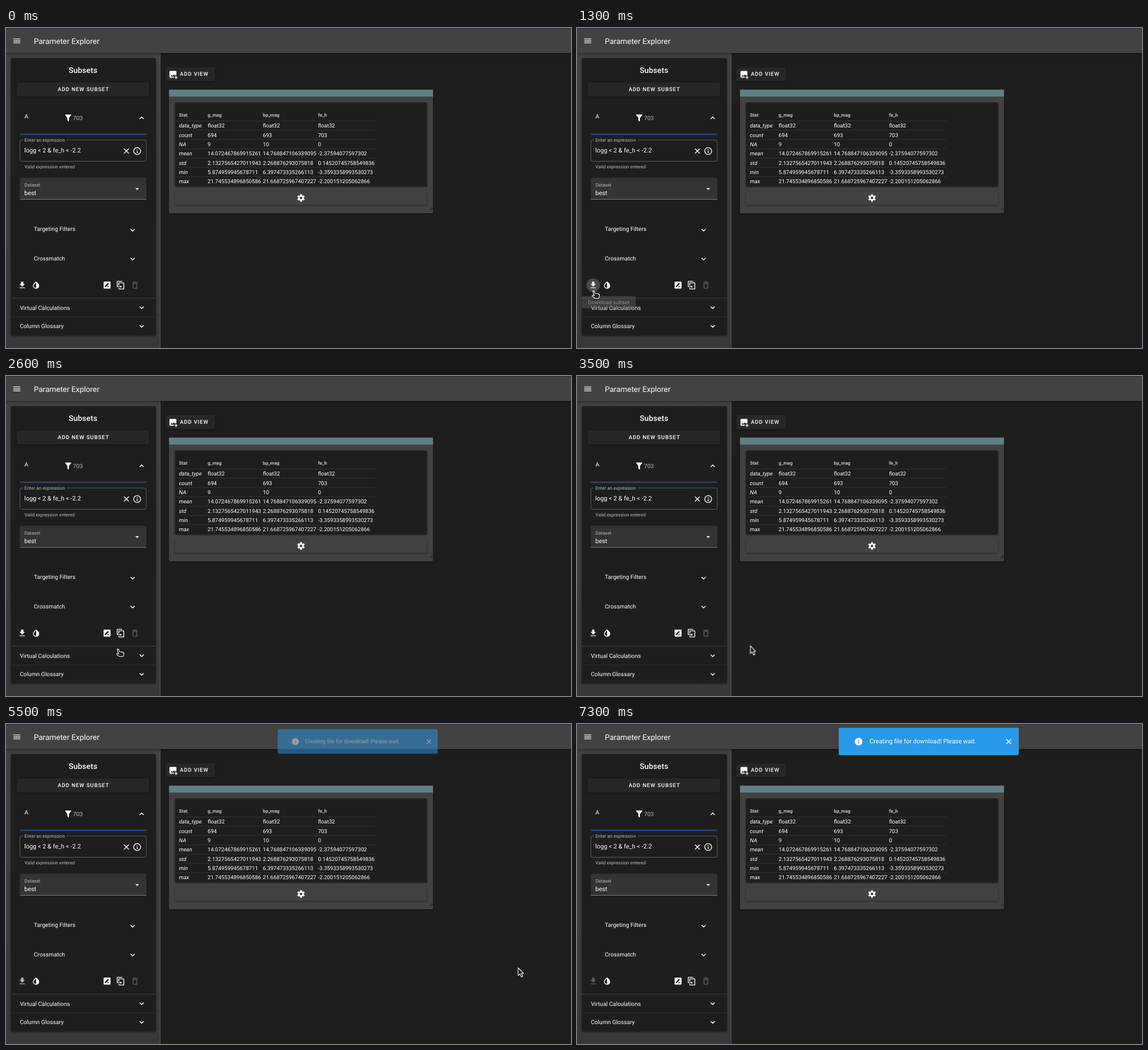
These frames come from a looping animation (995 px wide and 563 px high, 8100 ms). An HTML page:

```html
<!DOCTYPE html>
<html lang="en">
<head>
<meta charset="utf-8">
<title>Parameter Explorer</title>
<style>
  html, body { margin: 0; width: 100%; height: 100%; overflow: hidden; background: #1e1f1c; }
  svg { display: block; width: 100%; height: 100%; }
  text { font-family: Roboto, sans-serif; fill: #fff; white-space: pre; text-rendering: geometricPrecision; }
  .raised { filter: drop-shadow(0 1px 1.5px rgba(0, 0, 0, .45)); }
  .pop { transform-box: fill-box; transform-origin: center; }
  .stroke { fill: none; stroke: #fff; stroke-width: 2; }
  .cursor { fill: #1c1c1c; stroke: #fff; stroke-width: 1.1; stroke-linejoin: round; }
  #hand, #arrow, #tip, #toast, #hover, #ripple { opacity: 0; }
</style>
</head>
<body>
<svg id="stage" viewBox="0 0 995 563" xmlns="http://www.w3.org/2000/svg"></svg>
<script>
const LOOP = 8100;
const SCALE = 0.6785;
const DARK = '#1e1f1c';
const MUTED = '#b9b9b8';

// Icons live on a 24-unit grid; "line" icons are stroked, the others filled.
const lineIcons = {
  menu: 'M3 7H21M3 12H21M3 17H21',
  up: 'M6.7 14.7L12 9.4L17.3 14.7',
  down: 'M6.7 9.3L12 14.6L17.3 9.3',
  close: 'M5.7 5.7L18.3 18.3M18.3 5.7L5.7 18.3',
  infoOutline: 'M3 12A9 9 0 1 1 21 12A9 9 0 1 1 3 12M12 7V9M12 11V17',
  trash: 'M7 8H17V19Q17 20 16 20H8Q7 20 7 19ZM5 5H19M9 4H15',
};
const solidIcons = {
  filter: 'M5 3H19Q20.6 3.4 19.8 4.6L14 12V20Q13.6 21.4 12.3 20.7L10 18.4V12L4.2 4.6Q3.4 3.4 5 3Z',
  caret: 'M7 10L12 15L17 10Z',
  download: 'M5 20H19V18H5ZM19 9H15V3H9V9H5L12 16Z',
  invert: 'M12 19.6A6 6 0 0 1 7.8 9.3L12 5.1ZM17.7 7.9L12 2.3L6.3 7.9A8 8 0 1 0 17.7 7.9Z',
  rename: 'M18 17H10.5L12.5 15H18ZM6 17V14.5L14.2 6.4L16.6 8.8L8.5 17ZM19 3H5Q3 3 3 5V19Q3 21 5 21H19Q21 21 21 19V5Q21 3 19 3Z',
  copy: 'M11 17H4Q2 17 2 15V3Q2 1 4 1H16V3H4V15H11V13L15 16L11 19ZM19 21V7H8V13H6V7Q6 5 8 5H19Q21 5 21 7V21Q21 23 19 23H8Q6 23 6 21V19H8V21Z',
  addImage: 'M5 3Q3 3 3 5V19Q3 21 5 21H14.1Q13.9 19.5 14.3 18H5L8.5 13.5L11 16.5L14.5 12L16.7 15Q18.6 13.8 21 14.1V5Q21 3 19 3ZM19 16V19H16V21H19V24H21V21H24V19H21V16Z',
  info: 'M13 9H11V7H13ZM13 17H11V11H13ZM12 2A10 10 0 1 0 12 22A10 10 0 1 0 12 2Z',
};

const icon = (name, x, y, attrs = '') => {
  const line = lineIcons[name];
  const look = line ? 'class="stroke"' : 'fill="#fff" fill-rule="evenodd"';
  return `<path d="${line || solidIcons[name]}" ${look} ${attrs}
    transform="translate(${x} ${y}) scale(${SCALE}) translate(-12 -12)"/>`;
};
const text = (str, x, y, size = 10.18, style = '') =>
  `<text x="${x}" y="${y}" font-size="${size}" style="${style}">${str.replace(/&/g, '&amp;').replace(/</g, '&lt;')}</text>`;
const box = (x, y, w, h, fill, r = 0, attrs = '') =>
  `<rect x="${x}" y="${y}" width="${w}" height="${h}" rx="${r}" fill="${fill}" ${attrs}/>`;
const rule = (x1, x2, y, color, width = 0.7) =>
  `<path d="M${x1} ${y}H${x2}" stroke="${color}" stroke-width="${width}"/>`;

const RAISED = 'class="raised"';
const BUTTON = 'font-weight:500;letter-spacing:.85px';

const sidebar = () => `
  <linearGradient id="shade" x2="0" y2="1"><stop stop-color="#424242"/><stop offset="1" stop-color="#383838"/></linearGradient>
  ${box(0, 44, 271, 519, 'url(#shade)')}
  ${box(271, 44, 1, 519, '#565655')}
  ${box(8.5, 53, 255.5, 488, DARK, 3, RAISED)}
  ${text('Subsets', 110.5, 79, 13.57, 'font-weight:500;letter-spacing:.17px')}
  ${box(19, 96, 233, 24.5, '#272726', 2.5, RAISED)}
  ${text('ADD NEW SUBSET', 91, 111.4, 9.5, BUTTON)}
  ${text('A', 32.5, 159)}
  ${icon('filter', 109.5, 158.3)}
  ${text('703', 118, 161.7, 10.18, `fill:${MUTED}`)}
  ${icon('up', 239, 158.2)}
  ${box(24.5, 185.6, 223, 2.6, '#20466f')}
  <path d="M30 197H27.5Q24.5 197 24.5 200V231.500Q24.500 234.500 27.500 234.500H244Q247 234.500 247 231.500V200Q247 197 244 197H107"
    fill="none" stroke="#6c6c6a" stroke-width=".8"/>
  ${text('Enter an expression', 32.5, 200.2, 8.14, `fill:${MUTED}`)}
  ${text('logg < 2 & fe_h < -2.2', 32.3, 219.3, 10.86)}
  ${icon('close', 212, 216.5)}
  ${icon('infoOutline', 231, 216.5)}
  ${text('Valid expression entered', 32.5, 247, 8.14, `fill:${MUTED}`)}
  ${box(24.5, 263.5, 222.5, 38, '#343432', 2.5)}
  ${rule(24.5, 247, 301.5, '#a2a2a0')}
  ${text('Dataset', 32.5, 279.4, 8.14, `fill:${MUTED}`)}
  ${text('best', 32.3, 294, 10.86)}
  ${icon('caret', 231, 283)}
  ${text('Targeting Filters', 49, 357.4)}${icon('down', 223, 355.5)}
  ${text('Crossmatch', 49, 408.6)}${icon('down', 223, 406.3)}
  <circle id="hover" cx="28.5" cy="452.500" r="12" fill="#343432"/>
  <circle id="ripple" cx="28.500" cy="452.500" r="12" fill="#fff"/>
  <g id="download">${icon('download', 28.5, 452.3)}</g>
  ${icon('invert', 53, 452.4)}
  ${icon('rename', 178, 452.4)}
  ${icon('copy', 202, 452.4)}
  ${icon('trash', 227, 452.4, 'opacity=".3"')}
  ${rule(8.5, 264, 475.4, '#42423f', 1)}
  ${text('Virtual Calculations', 24.4, 495.6)}${icon('down', 239, 492)}
  ${rule(8.5, 264, 508.4, '#343432')}
  ${text('Column Glossary', 24.4, 528.2)}${icon('down', 239, 524.8)}`;

const columns = [304.5, 355, 452.3, 549.4];
const rows = [
  ['data_type', 'float32', 'float32', 'float32'],
  ['count', '694', '693', '703'],
  ['NA', '9', '10', '0'],
  ['mean', '14.072467869915261', '14.768847106339095', '-2.37594077597302'],
  ['std', '2.1327565427011943', '2.268876293075818', '0.14520745758549836'],
  ['min', '5.874959945678711', '6.397473335266113', '-3.3593358993530273'],
  ['max', '21.745534896850586', '21.668725967407227', '-2.200151205062866'],
];
const table = () =>
  ['Stat', 'g_mag', 'bp_mag', 'fe_h']
    .map((name, c) => text(name, columns[c], 156, 8.25, 'font-weight:700;fill:#c3c3c2')).join('') +
  rows.map((row, r) => rule(301, 650, 163.5 + r * 16.35, '#3a3a38') +
    row.map((cell, c) => text(cell, columns[c], 175.3 + r * 16.35, 9.6, c ? '' : 'font-style:italic')).join('')
  ).join('');

const cog = (x, y) => {
  const teeth = [0, 60, 120, 180, 240, 300]
    .map(a => `<path d="M0 -4.200V-6.700" stroke-width="3.2" transform="rotate(${a})"/>`).join('');
  return `<g transform="translate(${x} ${y})" fill="none" stroke="#fff">
    <circle r="3.700" stroke-width="2.700"/>${teeth}</g>`;
};

const mainView = () => `
  ${box(281, 69, 87, 24.5, '#272726', 2.5, RAISED)}
  ${icon('addImage', 294, 81.5)}
  ${text('ADD VIEW', 306.3, 84.4, 9.5, BUTTON)}
  ${box(287, 108.5, 465, 217.5, '#424240', 2.5, RAISED)}
  ${box(287, 108.5, 465, 12.2, '#5f8088')}
  ${box(297.5, 131.3, 444, 147.5, DARK, 2.5, RAISED)}
  ${table()}
  ${box(297.5, 287.5, 444, 23.5, '#424240', 2.5, RAISED)}
  ${cog(519.5, 299)}
  <path d="M746 319H750V315" fill="none" stroke="#1c1c1b"/>`;

const appBar = () => `
  ${box(-5, 0, 1005, 44, '#424242', 0, 'style="filter:drop-shadow(0 1.5px 2.5px rgba(0,0,0,.5))"')}
  ${box(0, 0, 995, 1, '#303030')}
  ${icon('menu', 19, 22.7)}
  ${text('Parameter Explorer', 49, 27.5, 13.57)}`;

const overlays = () => `
  <g id="tip" class="pop">
    ${box(8.2, 471.6, 95.2, 21.7, '#616161', 2.7, 'fill-opacity=".9"')}
    ${text('Download subset', 19.2, 485.7, 9.5)}
  </g>
  <g id="toast" class="pop">
    ${box(461, 6.5, 317, 48.5, '#2b99e9', 2.7)}
    ${icon('info', 496, 31)}
    ${text('Creating file for download! Please wait.', 515.3, 34.4, 10.86)}
    ${icon('close', 760.3, 31)}
  </g>
  <path id="hand" class="cursor" d="M-5.200 -6Q-4 -7.400 -2.800 -5.800L-1 -2L4.500 -1.200Q6.800 -.6 6.500 2L5.500 6.500H-1.500L-6 2.800Q-6.500 1 -4.300 1.300L-2.600 2Z"/>
  <path id="arrow" class="cursor" d="M0 0V13.500L3.200 10.600L5.600 16L8 15L5.600 9.800H9.600Z"/>`;

document.getElementById('stage').innerHTML = sidebar() + mainView() + appBar() + overlays();

// Each row is [start ms, properties]; a pose holds until the next row.
function track(id, poses) {
  const frames = poses.map(([ms, props]) => ({ offset: ms / LOOP, easing: 'steps(1, end)', ...props }));
  frames.push({ ...frames[frames.length - 1], offset: 1 });
  document.getElementById(id).animate(frames, { duration: LOOP, iterations: Infinity });
}
const fade = opacity => ({ opacity });
const grow = (opacity, scale) => ({ opacity, transform: `scale(${scale})` });
const at = (x, y, opacity = 1) => ({ opacity, transform: `translate(${x}px, ${y}px)` });
const smooth = p => p * p * (3 - 2 * p);
const glide = (start, steps, [x0, y0], [x1, y1]) =>
  Array.from({ length: steps }, (_, i) => {
    const p = smooth((i + 1) / steps);
    return [start + i * 100, at(x0 + (x1 - x0) * p, y0 + (y1 - y0) * p)];
  });

track('hand', [
  [0, at(263, 533, 0)], [300, at(263, 533)], [400, at(178, 507)], [500, at(95, 483)],
  [600, at(48, 472)], [700, at(33, 469)],
  ...glide(2000, 7, [33, 469], [201, 487]),
  [3400, at(236, 486)], [3500, at(236, 486, 0)],
]);
track('arrow', [
  [0, at(236, 480, 0)],
  ...glide(3500, 5, [236, 480], [902, 429]),
  [6100, at(926, 414)], [6200, at(979, 381)], [6300, at(995, 370, 0)],
]);
track('hover', [[0, fade(0)], [700, fade(0.5)], [800, fade(1)], [2000, fade(0.6)], [2100, fade(0)]]);
track('ripple', [[0, fade(0)], [1300, fade(0.1)], [1400, fade(0.14)], [1500, fade(0.1)], [1600, fade(0.05)], [1700, fade(0)]]);
track('tip', [
  [0, grow(0, 0.8)], [800, grow(0.72, 0.9)], [900, grow(0.97, 0.99)], [1000, grow(1, 1)],
  [1300, grow(0.5, 1)], [1400, grow(0, 1)],
]);
track('download', [[0, fade(1)], [5500, fade(0.7)], [5600, fade(0.36)], [5700, fade(0.3)]]);
track('toast', [[0, grow(0, 0.8)], [5500, grow(0.5, 0.889)], [5600, grow(0.95, 0.99)], [5700, grow(1, 1)]]);
</script>
</body>
</html>
```
